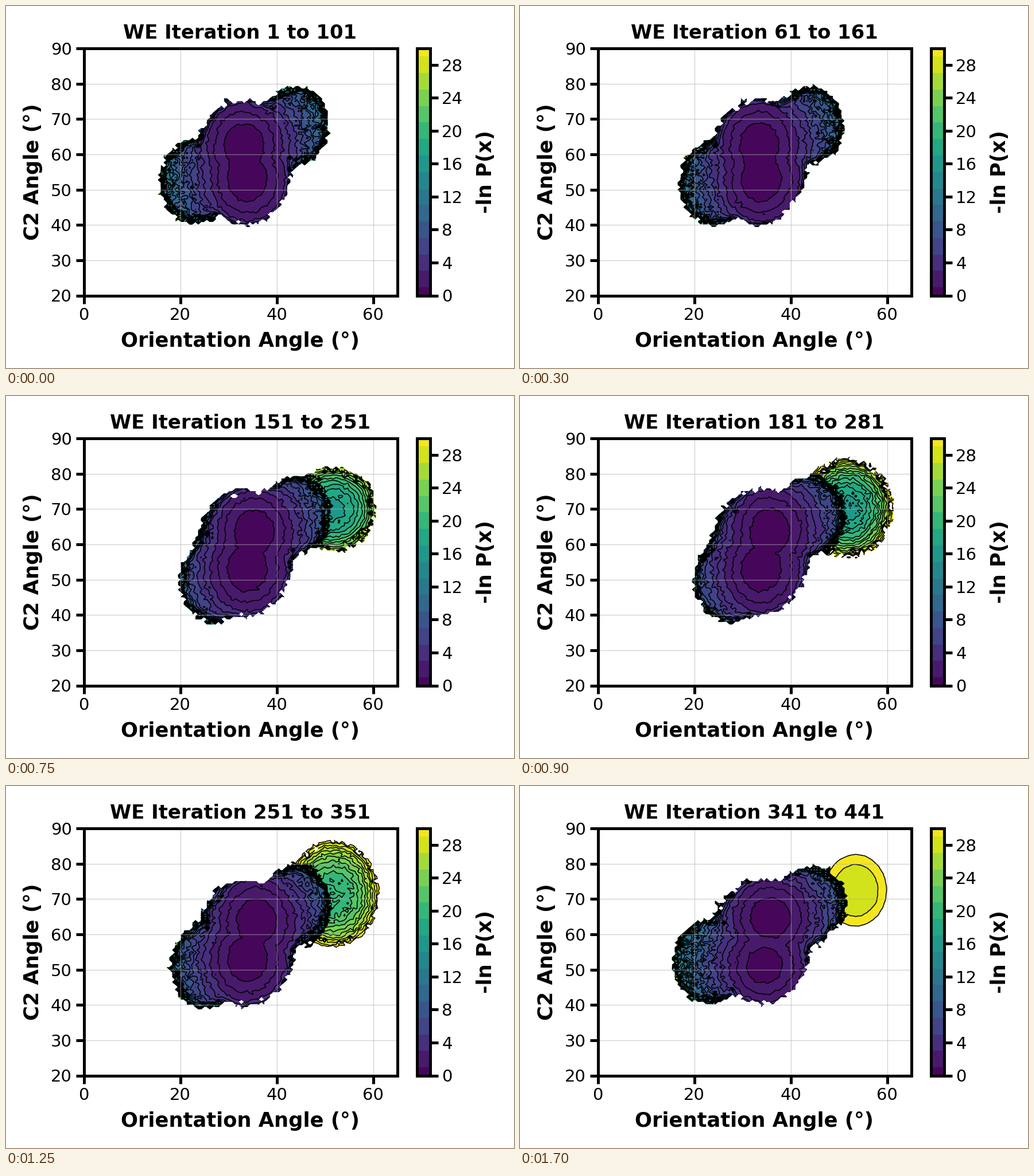
Recreate the animation shown at these times as a matplotlib script. Size 885 by 632 pixels, loop 1.75 s.

```python
import numpy as np
import matplotlib.pyplot as plt
from matplotlib.animation import FuncAnimation

W, H, DPI = 885, 632, 100
FRAMES, INTERVAL = 35, 50
LEFT, RIGHT, TOP, BOTTOM = 135.5, 681.5, 74, 505.5
PX = 72 / DPI  # points per pixel

# Histogram bins, in stage pixels and in degrees
X, Y = np.meshgrid(np.arange(240, 680, 5.0), np.arange(80, 414, 4.3))
LON = (X - LEFT) / (RIGHT - LEFT) * 65
LAT = 20 + (BOTTOM - Y) / (BOTTOM - TOP) * 70

rng = np.random.default_rng(7)
GRAIN = rng.normal(size=(FRAMES + 2, 3) + X.shape)
CHANCE = rng.random((FRAMES,) + X.shape)


def ease(n, start, end):
    u = np.clip((n - start) / (end - start), 0, 1)
    return u * u * (3 - 2 * u)


def ramp(v, start, end):
    return np.clip((v - start) / (end - start), 0, 1)


def oval(cx, cy, rx, ry):
    """Distance from the centre, 1 on the rim."""
    return np.hypot((X - cx) / rx, (Y - cy) / ry)


def soft_min(sharp, *fields):
    return -np.log(sum(np.exp(-sharp * f) for f in fields)) / sharp


def basin_edge(n):
    """Sampled area: a tall middle with a left and a right wing."""
    sway = np.cos(2 * np.pi * n / (FRAMES - 1))
    t = n / (FRAMES - 1)
    return soft_min(12,
                    oval(415 + 5 * t, 272, 86 + 4 * t, 112),
                    oval(345 - 18 * sway, 315 - 8 * sway, 62, 75),
                    oval(505, 208, 60, 70))


def basin(n, s, value, spike):
    """Two merging wells with a rough, steep rim on both sides."""
    drift, split = ease(n, 2, 20), ease(n, 24, 34)
    width = np.where(X < 420, 33, 36)
    height = 39 - 4 * split
    upper = oval(413 + 22 * drift, 244 - 8 * drift - 6 * split, width, height)
    lower = oval(419 + 6 * split, 302 + 11 * split, width, height)
    f = np.maximum(soft_min(4, upper ** 2, lower ** 2 + 0.2 * split), 0) ** 0.85

    side = ramp(f, 3, 6)
    f = f + (12 - 5 * ease(n, 5, 20)) * side * ramp(s, 0.75, 1) ** 2
    f = f + np.minimum(0.04 + 0.03 * f ** 1.5, 2) * value
    return np.clip(f + spike * (CHANCE[n] < 0.45 * side * ramp(s, 0.75, 1)), 0, 27)


def lobe(n, value, edge, spike):
    """Region that buds off to the upper right, then fades and shrinks."""
    grow, swell, shrink = ease(n, 9, 15), ease(n, 14, 21), ease(n, 29, 34)
    size = max(grow, 0.1) * (1 - 0.33 * shrink)
    rho = oval(530 + 40 * grow + 15 * shrink, 197 - 15 * ease(n, 14, 34),
               (68 + 12 * swell) * size, (66 + 27 * swell) * size)
    low = 16.5 + 11.7 * ease(n, 20, 34)
    rise = 24 + 6 * swell - low
    f = low + rise * rho ** 2.5 + 0.01 * rise ** 1.5 * value
    f += spike * rise / 13 * (CHANCE[n] < 0.25 * ramp(rho, 0.85, 1) * ramp(rise, 2, 8))
    return np.where(rho + 0.006 * rise * edge < 1.12, f, np.nan)


def landscape(n):
    """-ln P on the bins, masked where nothing was sampled."""
    value, edge, jump = GRAIN[n:n + 3].sum(axis=0) / 3 ** 0.5
    spike = 3 + 4 * np.abs(jump)
    s = basin_edge(n)
    field = np.where(s + 0.04 * edge < 1, basin(n, s, value, spike),
                     lobe(n, value, edge, spike))
    return np.ma.masked_invalid(field)


BANDS = np.array([0, *range(1, 30, 2), 30])
MIDDLES = (BANDS[1:] + BANDS[:-1]) / 2
COLORS = plt.get_cmap("viridis")(MIDDLES / 30)

plt.rcParams["font.family"] = "DejaVu Sans"
fig = plt.figure(figsize=(W / DPI, H / DPI), dpi=DPI, facecolor="white")


def add_axes(left, right):
    ax = fig.add_axes([left / W, 1 - BOTTOM / H,
                       (right - left) / W, (BOTTOM - TOP) / H])
    for spine in ax.spines.values():
        spine.set(linewidth=5 * PX, zorder=5)
    ax.tick_params(length=14 * PX, width=5 * PX, labelsize=21, pad=4.8)
    return ax


def label(x, y, text, size, rotation=0):
    return fig.text(x / W, 1 - y / H, text, fontsize=size, weight="bold",
                    ha="center", va="baseline", rotation=rotation,
                    rotation_mode="anchor")


ax = add_axes(LEFT, RIGHT)
ax.set(xlim=(0, 65), ylim=(20, 90), xticks=range(0, 61, 20),
       yticks=range(20, 91, 10))
ax.set_axisbelow(False)
ax.grid(color="#b0b0b0", alpha=0.6, linewidth=1.2 * PX)

bar = add_axes(716, 738.5)
bar.barh(BANDS[:-1], 1, height=np.diff(BANDS), align="edge", color=COLORS)
bar.yaxis.tick_right()
bar.set(xlim=(0, 1), xticks=[], ylim=(0, 30), yticks=range(0, 29, 4))

title = label(408, 57, "", 24.35)
label(408, 595, "Orientation Angle (°)", 25.4)
label(57.5, 290, "C2 Angle (°)", 25.4, 90)
label(846, 290, "-ln P(x)", 25.4, 90)

drawn = []


def update(n):
    while drawn:
        drawn.pop().remove()
    field = landscape(n)
    drawn.append(ax.contourf(LON, LAT, field, levels=BANDS, colors=COLORS))
    drawn.append(ax.contour(LON, LAT, field, levels=range(1, 31),
                            colors="black", linewidths=1.6 * PX))
    first = 1 + 10 * n
    title.set_text(f"WE Iteration {first} to {first + 100}")


anim = FuncAnimation(fig, update, frames=FRAMES, init_func=lambda: update(0),
                     interval=INTERVAL, repeat=True, repeat_delay=0, blit=False)
plt.show()
```
